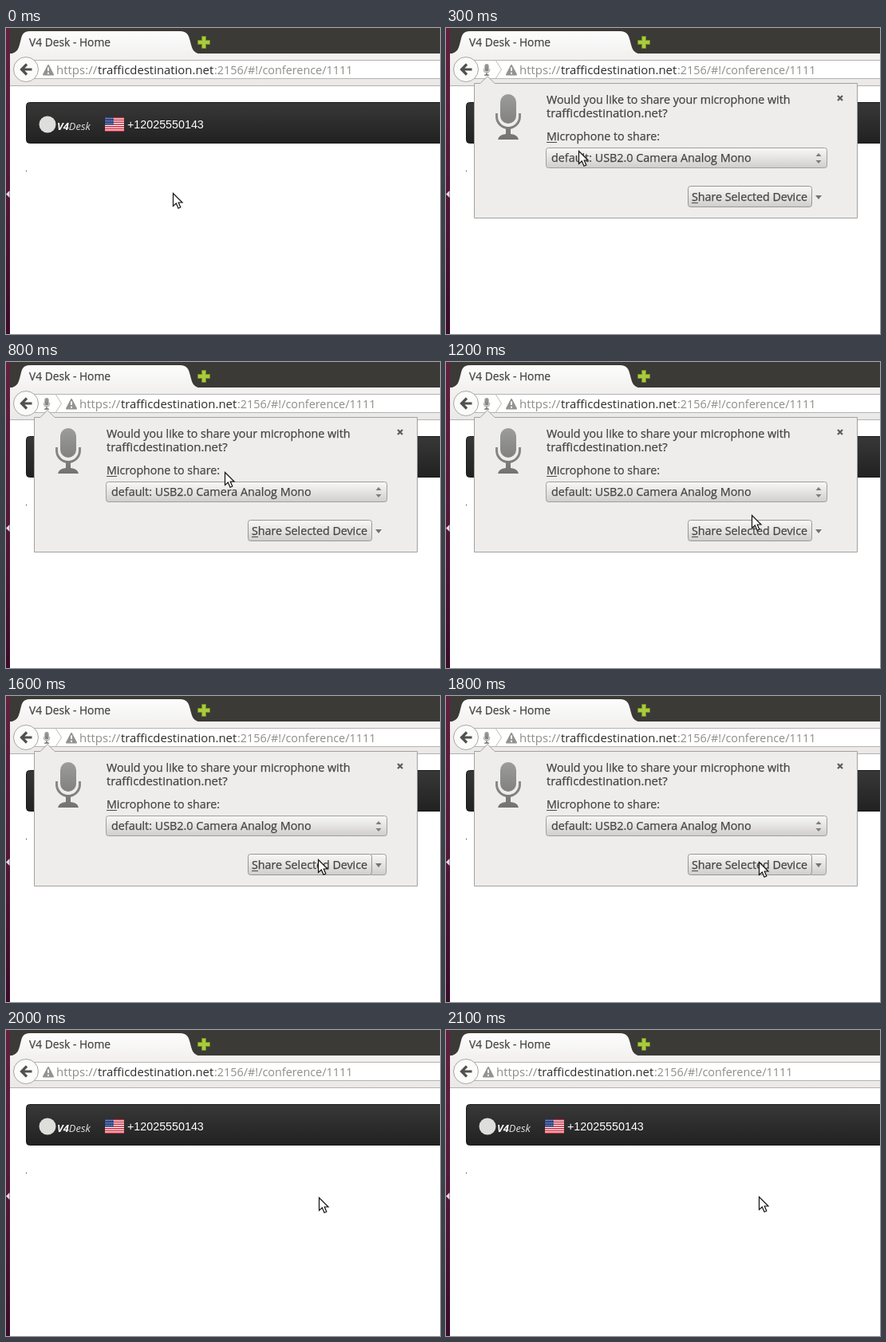
An HTML page that plays this animation: 544x384 px, repeating every 2200 ms.

```html
<!DOCTYPE html>
<html lang="en">
<head>
<meta charset="utf-8">
<title>Microphone permission</title>
<style>
  html, body { margin: 0; width: 100%; height: 100%; overflow: hidden; background: #fff; }
  svg { display: block; }
  text { font: 14.25px "Open Sans", "Noto Sans", sans-serif; fill: #444442; stroke: #444442; stroke-width: .25; white-space: pre; }
  #url text { fill: #8d8d8b; stroke: none; }
  #url .host { fill: #2b2b2a; }
  .phone { font: 14.3px "Liberation Sans", Arial, sans-serif; fill: #fff; stroke: none; }
  .brand { font-size: 13px; font-style: italic; fill: #dededc; stroke: none; }
  .brand tspan { font-weight: 700; fill: #fff; }
  .pressed rect { fill: #cbcac8; }
  .pressed #share { stroke: #e9703e; stroke-width: 1.6; }
</style>
</head>
<body>
<svg width="544" height="384" viewBox="0 0 544 384">
  <defs>
    <linearGradient id="desk" x2="0" y2="1">
      <stop stop-color="#63203f"/><stop offset=".5" stop-color="#54183a"/><stop offset="1" stop-color="#3b0b2a"/>
    </linearGradient>
    <linearGradient id="tab" x2="0" y2="1">
      <stop stop-color="#fdfdfd"/><stop offset="1" stop-color="#f3f2f1"/>
    </linearGradient>
    <linearGradient id="tools" x2="0" y2="1">
      <stop stop-color="#f3f2f1"/><stop offset="1" stop-color="#eae9e8"/>
    </linearGradient>
    <linearGradient id="nav" x2="0" y2="1">
      <stop stop-color="#383838"/><stop offset="1" stop-color="#212121"/>
    </linearGradient>
    <linearGradient id="button" x2="0" y2="1">
      <stop stop-color="#f8f8f7"/><stop offset=".5" stop-color="#e5e4e2"/><stop offset="1" stop-color="#cfcecb"/>
    </linearGradient>
    <linearGradient id="metal" gradientUnits="userSpaceOnUse" x2="0" y2="57">
      <stop stop-color="#9c9c9a"/><stop offset="1" stop-color="#727270"/>
    </linearGradient>
    <g id="mic" fill="url(#metal)">
      <rect x="-10" width="20" height="37" rx="10"/>
      <path d="M-14.500 24v4a14.500 14.500 0 0 0 29 0v-4" fill="none" stroke="url(#metal)" stroke-width="3"/>
      <path d="M-3 43h6v7q9 1 10 7h-26q1-6 10-7z"/>
    </g>
  </defs>

  <!-- desktop edge and browser frame -->
  <rect width="5" height="384" fill="url(#desk)"/>
  <path d="M0 208.500l4.500-4.500v9z" fill="#e4dfe2"/>
  <rect x="5" width="539" height="33" fill="#3b3a36"/>
  <rect x="5" y="32" width="539" height="40" fill="url(#tools)"/>
  <path d="M5 32.500C15 31 16 25 18 17S21 4 30 4H218C227 4 229 9 231 17S234 31 243 32.500z" fill="url(#tab)"/>
  <path d="M5 72.500H544" stroke="#b3b2b0"/>
  <text x="29" y="23" style="font-size:13.8px">V4 Desk - Home</text>
  <path d="M245.500 10.500h5v5h5v5h-5v5h-5v-5h-5v-5h5z" fill="#a9cb3c" stroke="#6f8f22"/>

  <!-- address bar -->
  <rect x="30.500" y="40.500" width="530" height="23" fill="#fff" stroke="#b4b3b1"/>
  <circle cx="25" cy="52" r="15.500" fill="#fbfbfa" stroke="#a8a7a5"/>
  <path d="M32.500 52H20M26 45.500L19.500 52L26 58.500" fill="none" stroke="#50504e" stroke-width="3.200"/>
  <g id="sharing">
    <use href="#mic" transform="translate(51 45) scale(.26)"/>
    <path d="M62.500 41L69.500 52L62.500 63" fill="none" stroke="#bebdbb"/>
  </g>
  <g id="url">
    <path d="M53 47L59 58.500H47z" fill="#939391" stroke="#939391" stroke-width="2" stroke-linejoin="round"/>
    <path d="M53 49.500v4.500M53 55.800v2" stroke="#fff" stroke-width="2"/>
    <text x="63" y="58" style="font-size:15px">https://</text>
    <text x="115" y="58" class="host" style="font-size:14.9px">trafficdestination.net</text>
    <text x="261" y="58" style="font-size:14.4px">:2156/#!/conference/1111</text>
  </g>

  <!-- page -->
  <rect x="25.500" y="93.500" width="540" height="51" rx="4" fill="url(#nav)" stroke="#181818"/>
  <circle cx="52" cy="121" r="10.500" fill="#dededc"/>
  <text x="64" y="128" class="brand"><tspan>V4</tspan>Desk</text>
  <path d="M136 112v18" stroke="#fff" stroke-width="24"/>
  <path d="M136 112v18" stroke="#c8283c" stroke-width="24" stroke-dasharray="1.385"/>
  <rect x="124" y="112" width="11" height="9.700" fill="#2f4685"/>
  <path d="M125 113.500h10M125 116.800h10M125 120h10" stroke="#c3cbe0" stroke-dasharray="1 1.200"/>
  <text x="152" y="126" class="phone">+12025550143</text>
  <rect x="25" y="179" width="1" height="1" fill="#222"/>

  <!-- permission panel -->
  <g id="panel">
    <path d="M35.500 69.500H43L52 60.500L61 69.500H515.500V238.500H35.500z" fill="#eeedec" stroke="#a2a19f"/>
    <use href="#mic" x="78" y="83"/>
    <text x="126" y="95">Would you like to share your microphone with</text>
    <text x="126" y="112" style="font-size:14.9px">trafficdestination.net?</text>
    <path d="M491 85l6 6m0-6l-6 6" stroke="#5c5c5a" stroke-width="2.200"/>
    <text x="126" y="141">Microphone to share:</text>
    <rect x="125.500" y="150.500" width="352" height="25" rx="3" fill="url(#button)" stroke="#a09f9c"/>
    <text x="132" y="168" style="font-size:14.35px">default: USB2.0 Camera Analog Mono</text>
    <path d="M463.500 161l3.500-4l3.500 4zM463.500 166l3.500 4l3.500-4z" fill="#7d7d7b"/>
    <g id="buttons" fill="url(#button)">
      <rect id="menu" x="455.500" y="198.500" width="21" height="26" rx="3" stroke="#a09f9c"/>
      <rect id="share" x="303.500" y="198.500" width="155" height="26" rx="3" stroke="#989794"/>
    </g>
    <text x="308" y="217">Share Selected Device</text>
    <path d="M463 210h8l-4 5z" fill="#737371"/>
    <path d="M126 143.500h13M308 219.500h8" stroke="#4a4a48"/>
  </g>

  <path id="cursor" d="M.5.500V16.500L4.300 13L7 19.300L9.800 18L7.200 12H12z" fill="#fff" stroke="#111" stroke-width="1.200"/>
</svg>
<script>
  const LOOP = 2200, STEP = 100;
  // time, x, y of the pointer tip
  const route = [
    [0, 209, 207], [100, 205, 200], [400, 146, 131], [800, 274, 138],
    [1200, 383, 192], [1600, 391, 205], [1900, 392, 210], [2100, 392, 209]
  ];
  const el = id => document.getElementById(id);
  const show = (id, on) => el(id).setAttribute("visibility", on ? "inherit" : "hidden");

  function pointer(t) {
    const i = Math.max(1, route.findIndex(p => p[0] >= t));
    const [t0, x0, y0] = route[i - 1], [t1, x1, y1] = route[i];
    const k = (t - t0) / (t1 - t0);
    return [x0 + (x1 - x0) * k, y0 + (y1 - y0) * k].map(Math.round);
  }

  function panelOpacity(t) {
    if (t < 200 || t >= 2000) return 0;
    return t < 300 ? .6 : t < 1900 ? 1 : .84;
  }

  function draw(t) {
    const [x, y] = pointer(t), opacity = panelOpacity(t), open = opacity > 0;
    el("cursor").setAttribute("transform", `translate(${x} ${y})`);
    el("panel").setAttribute("opacity", opacity);
    show("sharing", open);
    el("url").setAttribute("transform", `translate(${open ? 29 : 0})`);
    show("menu", t > 1200 && y >= 198);
    el("buttons").classList.toggle("pressed", t >= 1900);
  }

  const start = performance.now();
  function tick() {
    const t = (performance.now() - start) % LOOP;
    draw(Math.floor(t / STEP) * STEP);
    requestAnimationFrame(tick);
  }
  tick();
</script>
</body>
</html>
```
